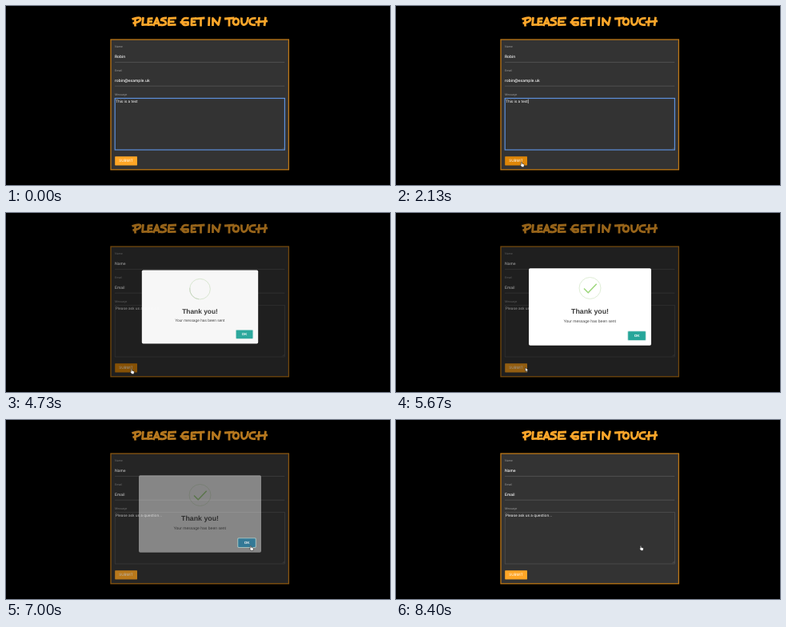
Animation of 480 by 224 pixels, one loop 9.14 s. Source, as an HTML page:

```html
<!DOCTYPE html>
<html lang="en">
<head>
<meta charset="utf-8">
<title>Contact form</title>
<style>
  html, body { margin: 0; height: 100%; overflow: hidden; background: #000; }
  svg { display: block; width: 100vw; height: 100vh; }
  text { font-family: Inter, "Liberation Sans", sans-serif; text-rendering: geometricPrecision; fill: #fff; }
  .label { font-size: 3.6px; fill: #999; }
  .value { font-size: 4.9px; font-weight: 500; }
  .area { font-size: 4.65px; }
  .mid { text-anchor: middle; }
  .dialog text { font-family: "Liberation Sans", Arial, sans-serif; }
  .line { fill: none; stroke: #646464; stroke-width: .6; }
  .title { fill: none; stroke: #faa52a; stroke-width: 2.8; stroke-linejoin: round; }
  .mouse path { fill: #fff; stroke: #111; stroke-width: .5; }
</style>
</head>
<body>
<svg viewBox="0 0 480 224">
  <rect width="480" height="224"/>
  <path class="title" role="img" aria-label="Please get in touch" d="
    M161.5 16V25.5M157.5 16.5Q168.5 13 168.2 16.5Q167.5 20.5 158.5 21.5
    M171.5 14 170.5 23.7 176.5 23.2
    M183.5 15.5 178 15.8 177.5 23.7 183.5 23.2M177.5 19.6 183 19.4
    M184.3 25 188.5 15 191.8 25M184.5 21.7H192
    M201 15Q194 15 194 17.7Q200.5 19 200 22Q198.5 24.5 192.5 23.5
    M213 15 203.7 15.5 203.2 23.7 212.5 23.3M203 19.6H210.5
    M228.5 15.5Q220.5 13.5 220 20Q220.5 25 227.5 23.5V20.3H217.5
    M238 15.5 232.2 15.8 231.8 23.8 238 23.3M231.8 19.6H237
    M236.5 15.8 248.5 15M243.5 15.5V25.5
    M254 13.8 253.5 25
    M258.5 25V15.5L265.5 23.5 267.7 13.5
    M273 16 285.5 15M279 16V25.5
    M287.5 15.5Q283.5 17 284 21Q286 25 290 22.5Q292.5 17 287.5 15.5Z
    M294.5 14.5Q293.5 23.7 297.5 23.5Q302 23 302.5 14
    M312.5 15.5Q304.5 14.5 304.5 20Q305 24.5 312 23.3
    M316.5 14 315.5 25.3M324.5 13.8 323 25M311.5 20.2 327 18.8"/>

  <rect x="131" y="42" width="222.4" height="162.8" fill="#333" stroke="#bd7716" stroke-width="1.3"/>
  <text class="label" x="136" y="52.3">Name</text>
  <text class="value" x="136" y="65.2" id="name"></text>
  <text class="label" x="136" y="82.1">Email</text>
  <text class="value" x="136" y="95" id="email"></text>
  <path class="line" d="M136 70.4H348.3M136 100.2H348.3"/>
  <text class="label" x="136" y="112">Message</text>
  <rect id="box" x="136.2" y="115.5" width="212.2" height="64.5" fill="none"/>
  <path class="line" d="M345.5 179.2 348 176.7M347 179.2 348 178.2"/>
  <text class="area" x="137" y="121" id="message"></text>
  <path id="caret" d="M165.3 116.7V122" stroke="#fff" stroke-width=".6"/>
  <rect id="submit" x="136.2" y="188.2" width="27.8" height="11.2" rx=".6"/>
  <text class="mid" x="150" y="195.4" font-size="4.5">SUBMIT</text>

  <rect id="shade" width="480" height="224"/>
  <g id="pop" class="dialog">
    <g id="card">
      <rect x="166" y="69.2" width="153" height="96.6" rx="1.8" fill="#fff"/>
      <circle cx="242.5" cy="94" r="13.5" fill="none" stroke="#dfeed6"/>
      <path id="spin" d="M242.5 80.5A13.5 13.5 0 0 1 256 94" fill="none" stroke="#c8d8c0" stroke-width=".8"/>
      <path id="tick" d="M235 94.5 240.2 99.8 250.7 88.8" pathLength="1" stroke-dasharray="1 2"
        fill="none" stroke="#9fd87e" stroke-width="1.6" stroke-linejoin="round"/>
      <text class="mid" x="242.5" y="126" style="fill:#3c3c3c" font-size="8.8" font-weight="bold">Thank you!</text>
      <text class="mid" x="242.3" y="136.8" style="fill:#444" font-size="5.07">Your message has been sent</text>
    </g>
    <g id="ok">
      <rect x="289.4" y="147.4" width="23.2" height="12.4" rx="1.4" fill="#b5dcd8"/>
      <rect id="okFace" x="290.2" y="148.2" width="21.6" height="10.8" rx=".8"/>
      <text class="mid" x="301" y="155.3" font-size="4.5" font-weight="bold">OK</text>
    </g>
  </g>

  <g id="mouse" class="mouse">
    <path id="hand" d="M0 .5Q.7-.6 1.3.5V2.2L3.4 2.8Q4.2 3.2 4 4L3.5 6.3H.9L-.9 3.9Q-.9 2.9 0 3.4Z"/>
    <path id="arrow" d="M0-.5V4.8L1.2 3.7 2 5.5 2.9 5.1 2.1 3.4H3.7Z"/>
  </g>
</svg>
<script>
const LOOP = 9140, OPEN = 4490, CLOSE = 7000;
const $ = id => document.getElementById(id);
const set = (id, attrs) => { for (const k in attrs) $(id).setAttribute(k, attrs[k]); };
const show = (id, on) => set(id, { visibility: on ? 'visible' : 'hidden' });
const progress = (t, a, b) => Math.min(1, Math.max(0, (t - a) / (b - a)));
const smooth = p => p * p * (3 - 2 * p);
const mix = (a, b, p) => a + (b - a) * p;
const colour = (a, b, p) => `rgb(${a.map((v, i) => Math.round(mix(v, b[i], p)))})`;

// Piecewise curve through [position, value] pairs, eased between them
function curve(p, points) {
  const i = Math.max(1, points.findIndex(q => p <= q[0]));
  const [a, b] = [points[i - 1], points[i]];
  return mix(a[1], b[1], smooth(progress(p, a[0], b[0])));
}

function drawForm(t) {
  const sent = t >= 4470, focused = t < 2330;
  $('name').textContent = sent ? 'Name' : 'Robin';
  $('email').textContent = sent ? 'Email' : 'robin@example.uk';
  $('message').textContent = sent ? 'Please ask us a question...' : 'This is a test';
  set('box', focused ? { stroke: '#5d90dc', 'stroke-width': 1.2 } : { stroke: '#585858', 'stroke-width': .6 });
  show('caret', [[130, 670], [1130, 1600], [2130, 2330]].some(([a, b]) => t >= a && t < b));
  const hover = progress(t, 1570, 1870) - progress(t, 5600, 5700);
  set('submit', { fill: colour([255, 166, 38], [222, 134, 8], hover) });
}

function drawDialog(t) {
  const closing = t >= CLOSE, left = 1 - progress(t, CLOSE, CLOSE + 170);
  const alpha = closing ? .45 * left : progress(t, OPEN, OPEN + 250);
  const scale = curve(progress(t, OPEN, OPEN + 300), [[0, .7], [.45, 1.05], [.8, .95], [1, 1]]);
  const icon = progress(t, OPEN, OPEN + 760);
  set('shade', { opacity: closing ? .28 * left : .4 * progress(t, OPEN - 30, OPEN + 80) });
  set('pop', { transform: `translate(242.5 117.5) scale(${scale}) translate(-242.5 -117.5)` });
  set('card', { opacity: alpha });
  set('ok', { opacity: closing ? .9 * left : alpha });
  set('okFace', { fill: closing ? '#2b7899' : '#26a69a' });
  set('spin', { transform: `rotate(${-45 - 405 * icon} 242.5 94)`, opacity: 1 - progress(icon, .6, 1) });
  set('tick', { 'stroke-dashoffset': 1 - progress(icon, .54, .95) });
  show('tick', icon > .54);
}

function drawMouse(t) {
  const enter = smooth(progress(t, 670, 1560)), cross = smooth(progress(t, 5560, 6530));
  const x = mix(mix(236, 156.3, enter), 305.3, cross);
  const y = mix(mix(224, 195.1, enter), 157.2, cross);
  const pointing = x < 164 && t < 5600 || x > 290;
  set('mouse', { transform: `translate(${x} ${y})` });
  show('hand', t >= 670 && pointing);
  show('arrow', t >= 670 && !pointing);
}

function frame() {
  const t = performance.now() % LOOP;
  drawForm(t);
  drawDialog(t);
  drawMouse(t);
  requestAnimationFrame(frame);
}
frame();
</script>
</body>
</html>
```
